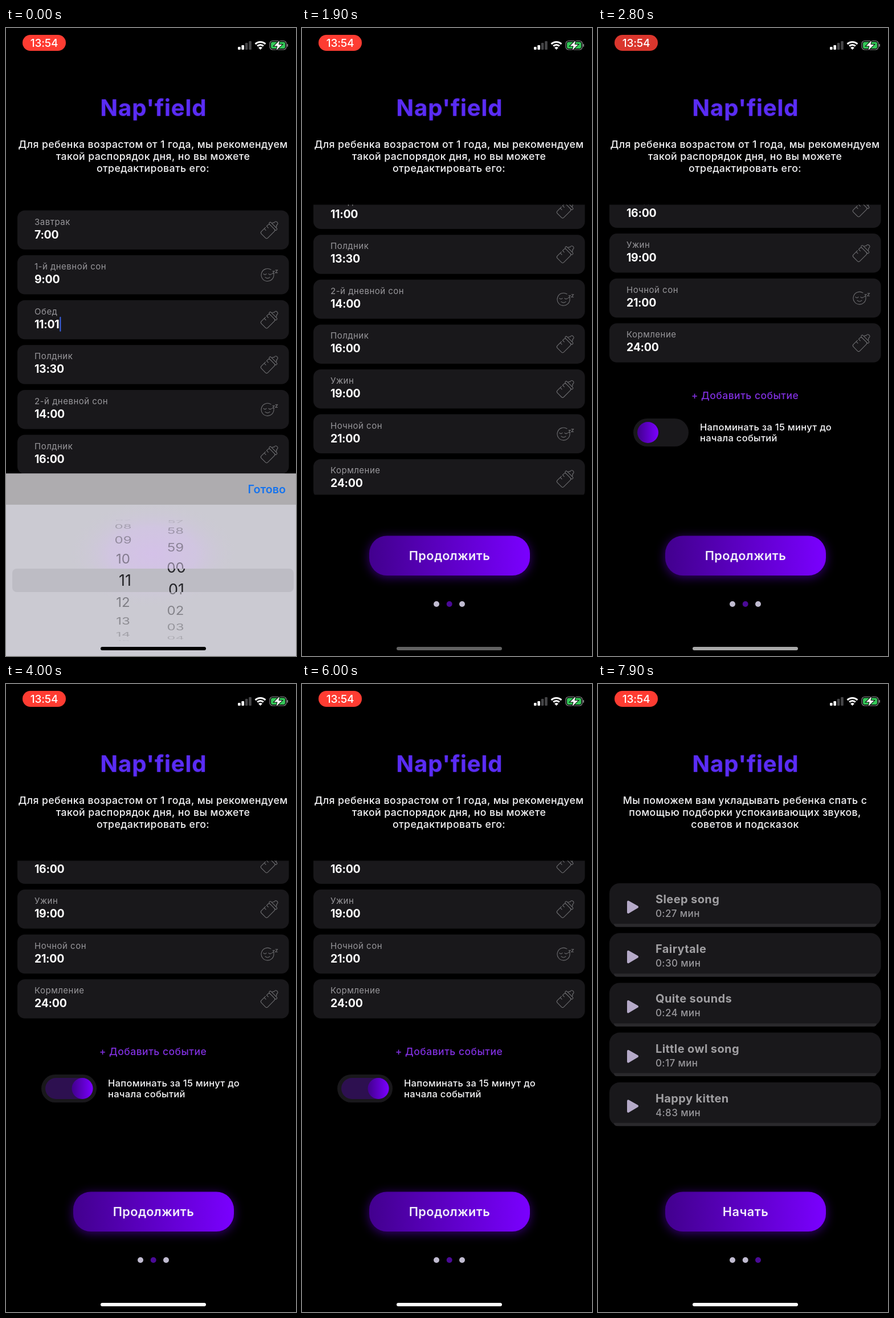
Animation, 509 px wide and 1100 px high, one loop 8000 ms. Source, as an HTML page with a canvas:

```html
<!DOCTYPE html>
<html lang="ru">
<head>
<meta charset="utf-8">
<title>Распорядок дня</title>
<style>
html, body { margin: 0; width: 100%; height: 100%; overflow: hidden; background: #000; }
canvas { display: block; }
</style>
</head>
<body>
<canvas id="stage" width="509" height="1100"></canvas>
<script>
const W = 509, H = 1100, LOOP = 8000;
const c = document.getElementById('stage').getContext('2d');
const CARD = '#19181b', PURPLE = '#5a2cf5', LINE = '#6c6c6f';

const EVENTS = [
  ['Завтрак', '7:00'], ['1-й дневной сон', '9:00', 1], ['Обед', '11:00'],
  ['Полдник', '13:30'], ['2-й дневной сон', '14:00', 1], ['Полдник', '16:00'],
  ['Ужин', '19:00'], ['Ночной сон', '21:00', 1], ['Кормление', '24:00']
];
const SONGS = [
  ['Sleep song', '0:27'], ['Fairytale', '0:30'], ['Quite sounds', '0:24'],
  ['Little owl song', '0:17'], ['Happy kitten', '4:83']
];
const SCROLL = [[1650, 0], [1800, 75], [1900, 192], [2000, 300], [2100, 385], [2200, 436],
  [2300, 452], [2450, 447], [2600, 436], [2800, 431]];
const HOME = [[1150, 0], [1900, 98], [2300, 130], [3900, 255]];

const clamp = u => Math.max(0, Math.min(1, u));
const span = (t, from, to) => clamp((t - from) / (to - from));
const smooth = u => (1 - Math.cos(Math.PI * u)) / 2;
const easeOut = u => 1 - (1 - u) ** 3;

function track(keys, t) {
  let value = keys[0][1];
  for (let i = 1; i < keys.length; i++) {
    const [t0, a] = keys[i - 1], [t1, b] = keys[i];
    if (t >= t0) value = a + (b - a) * span(t, t0, t1);
  }
  return value;
}

function text(s, x, y, size, weight, color, spacing = 0, align = 'left') {
  c.font = `${weight} ${size}px Inter, sans-serif`;
  c.letterSpacing = spacing + 'px';
  c.textAlign = align;
  c.fillStyle = color;
  c.fillText(s, x, y);
}

function box(x, y, w, h, r, fill) {
  c.beginPath();
  c.roundRect(x, y, w, h, r);
  c.fillStyle = fill;
  c.fill();
}

function disc(x, y, r, fill) {
  c.beginPath();
  c.arc(x, y, r, 0, 7);
  c.fillStyle = fill;
  c.fill();
}

function violet(x0, x1) {
  const g = c.createLinearGradient(x0, 0, x1, 0);
  g.addColorStop(0, '#42008e');
  g.addColorStop(1, '#7a00ff');
  return g;
}

function scoped(draw) {
  c.save();
  draw();
  c.restore();
}

function clipTo(x, y, w, h) {
  c.beginPath();
  c.rect(x, y, w, h);
  c.clip();
}

function icon(x, y, angle, d) {
  scoped(() => {
    c.translate(x, y);
    c.rotate(angle);
    c.strokeStyle = LINE;
    c.lineCap = 'round';
    c.lineWidth = 1.1;
    c.stroke(new Path2D(d));
  });
}

const bottle = y => icon(461, y + 1, Math.PI / 4,
  'M-8-3V-6Q-8-9-5-9H5Q8-9 8-6V10Q8 13 5 13H-5Q-8 13-8 10V0' +
  'M-8-3H-4M-8 3H-4M-7-13H7Q9-13 9-11T7-9H-7Q-9-9-9-11T-7-13' +
  'M-5-13Q-5-16-3-16.5Q-4-21 0-21T3-16.5Q5-16 5-13');

const sleeper = y => icon(459, y, 0,
  'M6-9.3A11 11 0 1 0 11-1M-7-2Q-4.5 1-2-2M2-2Q4.5 1 7-2M-4 4Q0 7.5 4 4' +
  'M9-6.5H12L9-2.5H12M14-8.5H17.5L14-4H17.5');

function header(lines) {
  scoped(() => {
    c.shadowColor = '#5a2cf566';
    c.shadowBlur = 3;
    text("Nap'field", 259, 154, 40, 700, PURPLE, 0.9, 'center');
  });
  lines.forEach((s, i) => text(s, 258, 210 + i * 21, 17.7, 500, '#f4f4f6', 0.4, 'center'));
}

function footer(label, active) {
  scoped(() => {
    c.shadowColor = '#5a00c499';
    c.shadowBlur = 18;
    c.shadowOffsetY = 3;
    box(118, 889.5, 282, 69.5, 31, violet(118, 400));
  });
  text(label, 259, 932, 21.7, 600, '#f2eefa', 0.5, 'center');
  [236, 258.7, 281].forEach((x, i) => disc(x, 1009, 5, i === active ? '#4a0a96' : '#c0bbd0'));
}

function toggle(y, on) {
  box(62, y, 97, 49, 24.5, CARD);
  scoped(() => {
    c.globalAlpha = on;
    box(69, y + 6, 84, 37, 18.5, '#2d1050');
  });
  const x = 87.5 + 46.5 * on;
  disc(x, y + 24.5, 18.5, violet(x - 18, x + 18));
}

function routine(t) {
  header(['Для ребенка возрастом от 1 года, мы рекомендуем',
    'такой распорядок дня, но вы можете', 'отредактировать его:']);
  scoped(() => {
    clipTo(0, 309.5, W, 508);
    c.translate(0, -track(SCROLL, t));
    EVENTS.forEach(([name, time, sleep], i) => {
      const y = 319.5 + i * 78.6, lunch = name === 'Обед';
      const value = lunch && t < 500 ? '11:01' : time;
      box(20, y, 476.5, 68.5, 13, CARD);
      text(name, 50, y + 25, 15, 400, '#98979b', 0.5);
      text(value, 50, y + 49, 19.5, 700, '#fff', -0.3);
      if (lunch && t < 900) box(51 + c.measureText(value).width, y + 29, 2, 26, 1, '#3a62e8');
      (sleep ? sleeper : bottle)(y + 34.5);
    });
    text('+ Добавить событие', 258, 1081, 17.5, 500, '#8130e0', 0.5, 'center');
    toggle(1115, smooth(span(t, 3250, 3500)));
    text('Напоминать за 15 минут до', 179, 1136, 16.5, 500, '#f4f4f6', 0.3);
    text('начала событий', 179, 1155, 16.5, 500, '#f4f4f6', 0.3);
  });
  footer('Продолжить', 1);
}

function sounds() {
  header(['Мы поможем вам укладывать ребенка спать с',
    'помощью подборки успокаивающих звуков,', 'советов и подсказок']);
  SONGS.forEach(([name, length], i) => {
    const y = 349 + i * 87.2;
    box(20, y, 476.5, 76.5, 18, CARD);
    box(28, y + 71, 461, 5.5, [0, 0, 5, 5], '#2a292c');
    c.fillStyle = c.strokeStyle = '#b5aac8';
    c.lineJoin = 'round';
    c.lineWidth = 4;
    c.beginPath();
    c.moveTo(53, y + 32.5);
    c.lineTo(69, y + 41.5);
    c.lineTo(53, y + 51);
    c.closePath();
    c.fill();
    c.stroke();
    text(name, 101, y + 35, 20, 700, '#a09fa2', 0.4);
    text(length + ' мин', 101, y + 59, 17, 500, '#98979b', 0.4);
  });
  footer('Начать', 2);
}

// Digits sit on a drum of radius 106.5 with 0.365 rad between rows.
function drum(value, count, x, size, color, alpha) {
  const base = Math.round(value);
  for (let n = base - 4; n <= base + 4; n++) {
    const angle = (n - value) * 0.365, flat = Math.cos(angle);
    if (flat <= 0.02) continue;
    scoped(() => {
      c.translate(x, 967.5 + 106.5 * Math.sin(angle));
      c.scale(1, flat);
      c.globalAlpha = alpha * flat ** 0.9;
      text(String((n + count) % count).padStart(2, '0'), 0, size * 0.364, size, 400, color, 0, 'center');
    });
  }
}

function picker(t) {
  const drop = 320 * smooth(span(t, 1000, 1370));
  if (drop >= 320) return;
  const minute = 0.59 * (1 - easeOut(span(t, 0, 500)));
  scoped(() => {
    c.translate(0, drop);
    box(0, 780.5, W, 320, 0, '#cbcad2');
    scoped(() => {
      clipTo(0, 835, W, 265);
      c.translate(258, 922 - drop);
      c.scale(1.6, 1);
      const g = c.createRadialGradient(0, 0, 0, 0, 0, 95);
      g.addColorStop(0, '#d4c1e8');
      g.addColorStop(0.5, '#d2c4e4cc');
      g.addColorStop(1, '#cbcad200');
      c.fillStyle = g;
      c.fillRect(-100, -100, 200, 200);
    });
    box(0, 780.5, W, 54.5, 0, '#aeacaf');
    text('Готово', 491, 815, 19.7, 600, t < 900 ? '#1573ee' : '#7f99c4', 0, 'right');
    box(11, 947, 494, 41, 8, '#bdbcc4');
    scoped(() => {
      c.beginPath();
      c.rect(0, 835, W, 112);
      c.rect(0, 988, W, 112);
      c.clip();
      drum(11, 24, 205.5, 24, '#222226', 0.48);
      drum(minute, 60, 297.5, 24, '#222226', 0.48);
    });
    scoped(() => {
      clipTo(0, 947, W, 41);
      drum(11, 24, 209, 27, '#222226', 1);
      drum(minute, 60, 299, 27, '#222226', 1);
    });
  });
}

function statusBar(t) {
  const dim = (1 - Math.cos(t * Math.PI / 1000)) / 2;
  box(29, 12, 76, 28, 14, `rgb(${255 - 41 * dim}, ${60 - 7 * dim}, ${50 - 5 * dim})`);
  text('13:54', 67, 33, 19, 500, '#fff', -0.2, 'center');

  [5, 8, 12, 15].forEach((h, i) => box(407 + i * 6.4, 38 - h, 4.6, h, 1.2, i < 2 ? '#fff' : '#454547'));

  c.strokeStyle = '#fff';
  c.lineWidth = 3.2;
  for (const r of [7.5, 12.5]) {
    c.beginPath();
    c.arc(446.5, 37, r, -Math.PI * 0.75, -Math.PI * 0.25);
    c.stroke();
  }
  c.fillStyle = '#fff';
  c.fill(new Path2D('M446.5 38L443 34.5Q446.5 31.5 450 34.5Z'));

  c.beginPath();
  c.roundRect(463, 22.5, 29, 15.5, 5);
  c.strokeStyle = '#8a8a8c';
  c.lineWidth = 1.2;
  c.stroke();
  box(465, 24.5, 25, 11.5, 3, '#35c759');
  box(493.2, 27.8, 1.8, 5, 1, '#8a8a8c');
  const bolt = new Path2D('M480 22L470.5 31.5H476.5L474.5 39L484.5 29H478.5Z');
  c.strokeStyle = '#000';
  c.lineWidth = 2;
  c.stroke(bolt);
  c.fillStyle = '#fff';
  c.fill(bolt);
}

function screen(x, draw) {
  scoped(() => {
    c.translate(x, 0);
    box(0, 0, W, H, 0, '#000');
    draw();
  });
}

function render(t) {
  const push = easeOut(span(t, 6150, 6650));
  if (push < 1) screen(-W * 0.3 * push, () => routine(t));
  if (push > 0) screen(W * (1 - push), sounds);
  picker(t);
  statusBar(t);
  const v = Math.round(track(HOME, t));
  box(166, 1084, 185, 6, 3, `rgb(${v}, ${v}, ${v})`);
}

function tick(now) {
  render(now % LOOP);
  requestAnimationFrame(tick);
}
requestAnimationFrame(tick);
</script>
</body>
</html>
```
